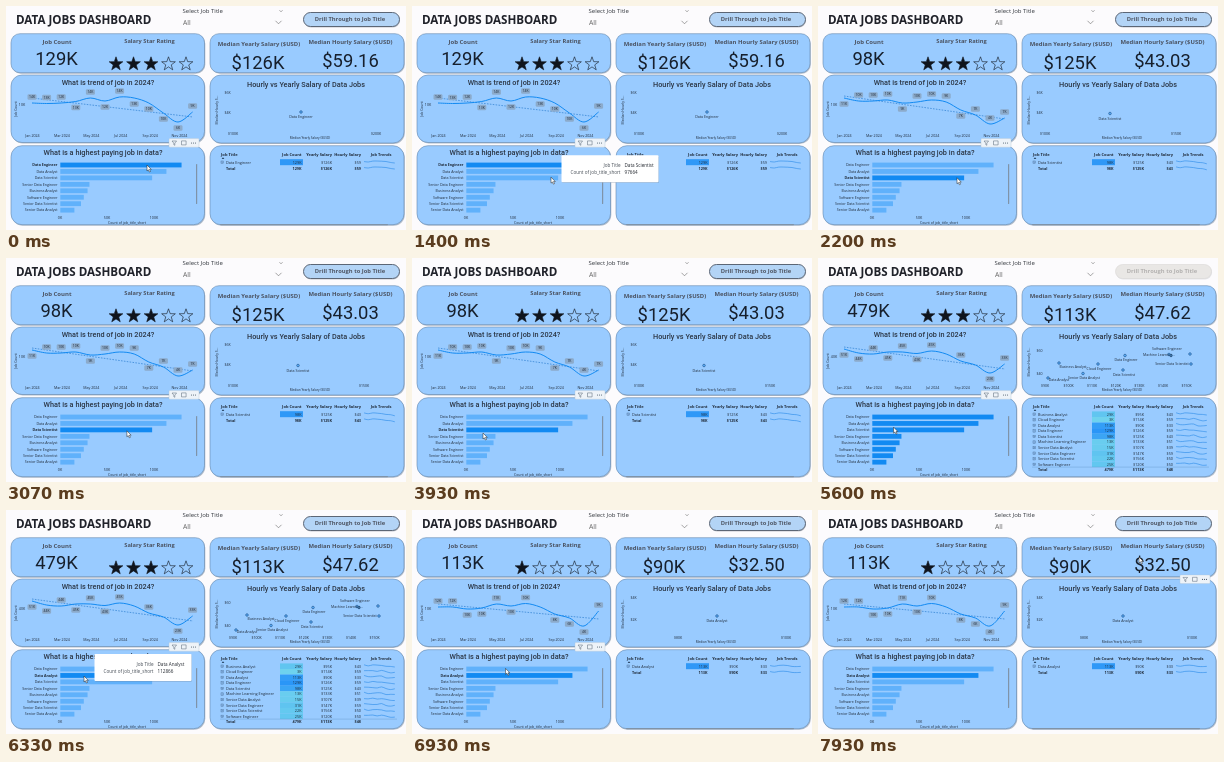
An HTML page for the animation above (8 s loop, 400x224 px).

```html
<!DOCTYPE html>
<html lang="en">
<head>
<meta charset="utf-8">
<title>Data Jobs Dashboard</title>
<style>
html, body { margin: 0; width: 100%; height: 100%; overflow: hidden; background: #fcfbfd; }
svg { display: block; width: 100vw; height: 100vh; font-family: "Open Sans", "Noto Sans", sans-serif; }
.din { font-family: Roboto, Arial, sans-serif; }
</style>
</head>
<body>
<svg id="stage" viewBox="0 0 400 224"><g id="base"></g><g id="live"></g></svg>
<script>
const LOOP = 8000;
const INK = '#1f2a38', TITLE = '#4a5261', PANEL = '#99cbff', BLUE = '#128af2', PALE = '#60b1fb';

// ---- helpers ----
const clamp = v => Math.max(0, Math.min(1, v));
const ease = v => { v = clamp(v); return v * v * (3 - 2 * v); };
const ramp = (t, a, b) => ease((t - a) / (b - a));
const mix = (a, b, k) => a + (b - a) * k;

// y is the middle of the capitals
function text(x, y, str, size, o = {}) {
  const turn = o.turn ? ` transform="rotate(-90 ${x} ${y})"` : '';
  return `<text x="${x}" y="${y + size * 0.36}" font-size="${size}" fill="${o.fill || INK}"` +
    ` text-anchor="${o.at || 'middle'}" font-weight="${o.w || 400}" class="${o.cls || ''}"${turn}>${str}</text>`;
}
const rect = (x, y, w, h, fill, more = '') =>
  `<rect x="${x}" y="${y}" width="${w}" height="${h}" fill="${fill}" ${more}/>`;
const line = (d, color, w, more = '') =>
  `<path d="${d}" fill="none" stroke="${color}" stroke-width="${w}" ${more}/>`;

function panel(x, y, w, h, r) {
  return rect(x + 0.8, y + 1, w, h, '#8494a8', `rx="${r}" opacity=".6"`) +
    rect(x, y, w, h, PANEL, `rx="${r}" stroke="#6688ad" stroke-width=".6"`);
}

function smooth(pts) {
  let d = `M${pts[0]}`;
  for (let i = 0; i < pts.length - 1; i++) {
    const a = pts[i - 1] || pts[i], b = pts[i], c = pts[i + 1], e = pts[i + 2] || c;
    d += `C${b[0] + (c[0] - a[0]) / 6} ${b[1] + (c[1] - a[1]) / 6} ` +
      `${c[0] - (e[0] - b[0]) / 6} ${c[1] - (e[1] - b[1]) / 6} ${c}`;
  }
  return d;
}

function star(cx, cy, r, full) {
  let p = '';
  for (let i = 0; i < 10; i++) {
    const a = Math.PI * (i / 5 - 0.5), q = i % 2 ? r * 0.4 : r;
    p += `${(cx + q * Math.cos(a)).toFixed(2)},${(cy + q * Math.sin(a)).toFixed(2)} `;
  }
  return `<polygon points="${p}" fill="${full ? '#10151d' : 'none'}" stroke="#10151d" stroke-width=".6"/>`;
}

// ---- data ----
// ys: monthly line heights; side: label above (u), below (d) or hidden (-)
const VIEWS = {
  engineer: {
    job: 'Data Engineer', count: '129K', year: '$126K', hour: '$59.16', stars: 3, tick: '10K',
    ys: [97, 97.5, 97, 95.5, 92, 95, 91, 92, 97, 107, 116, 106], side: 'uuudududdddu',
    labels: '14K 13K 12K 13K 14K 12K 14K 13K 10K 10K 6K 9K', trend: [92, 111],
    dot: [295, 106], xt: [['$100K', 227], ['$200K', 370]], yt: [['$6K', 87], ['$4K', 107]]
  },
  scientist: {
    job: 'Data Scientist', count: '98K', year: '$125K', hour: '$43.03', stars: 3, tick: '10K',
    ys: [92, 95, 95, 94, 97, 96, 94, 96, 104, 109, 118, 112], side: 'duuuduuuduuu',
    labels: '11K 10K 10K 10K 9K 10K 10K 9K 7K 7K 4K 7K', trend: [90, 113],
    dot: [292, 107.5], xt: [['$100K', 227], ['$150K', 358]], yt: [['$6K', 87], ['$4K', 106.5]]
  },
  all: {
    count: '479K', year: '$113K', hour: '$47.62', stars: 3, tick: '40K',
    ys: [91, 95, 96, 94, 94, 95.5, 93, 96, 103, 107, 115, 106], side: 'ddududu-u-du',
    labels: '51K 44K 44K 45K 45K 43K 45K 39K 36K 33K 23K 33K', trend: [89, 111],
    xt: '90 100 110 120 130 140 150'.split(' ').map((v, i) => [`$${v}K`, 227 + i * 23.6]),
    yt: [['$60', 93], ['$40', 116]]
  },
  analyst: {
    job: 'Data Analyst', count: '113K', year: '$90K', hour: '$32.50', stars: 1, tick: '10K',
    ys: [97, 97, 99, 98, 94, 96, 93.5, 97, 104, 108, 116, 101], side: 'uuddudu-dddu',
    labels: '12K 12K 10K 10K 11K 10K 10K 9K 8K 6K 4K 9K', trend: [94, 109],
    dot: [305, 106], xt: [['$80K', 266], ['$100K', 374]], yt: [['$4K', 88], ['$2K', 110]]
  }
};

const BARS = [['Data Engineer', 129], ['Data Analyst', 112.9], ['Data Scientist', 97.7],
  ['Senior Data Engineer', 31], ['Business Analyst', 29], ['Software Engineer', 25],
  ['Senior Data Scientist', 22], ['Senior Data Analyst', 15]];

const ROWS = [['Business Analyst', 29, 95, 43], ['Cloud Engineer', 3, 114, 59], ['Data Analyst', 113, 90, 33],
  ['Data Engineer', 129, 126, 59], ['Data Scientist', 98, 125, 43], ['Machine Learning Engineer', 13, 133, 51],
  ['Senior Data Analyst', 15, 107, 39], ['Senior Data Engineer', 31, 147, 59],
  ['Senior Data Scientist', 22, 156, 50], ['Software Engineer', 25, 120, 50]];

// name, dot x, dot y, label x, label y
const DOTS = [['Business Analyst', 241, 105, 255, 109], ['Cloud Engineer', 280, 106, 281, 111],
  ['Data Analyst', 230, 120, 241, 122], ['Senior Data Analyst', 265, 115.5, 266, 120],
  ['Data Engineer', 307, 97.5, 308, 102], ['Data Scientist', 305, 112, 306, 117],
  ['Software Engineer', 353, 97.5, 349, 91], ['Machine Learning...', 351, 96.5, 341, 96.7],
  ['', 372, 96, 372, 96], ['Senior Data Scientist', 373, 106, 354, 106]];

// ---- timeline ----
const SHOWN = [[0, 'engineer'], [1870, 'scientist'], [4400, 'all'], [6470, 'analyst']];
const PICKED = [[0, 'Data Engineer'], [1800, 'Data Scientist'], [4270, ''], [6200, 'Data Analyst']];
const PATH = [[0, 142, 161], [350, 142, 161], [950, 140, 173], [2800, 140, 174], [3600, 72, 177],
  [5300, 72, 177], [5800, 79, 168], [6800, 79, 168], [7650, 322, 49], [8000, 322, 49]];
const TIPS = [[1070, 1900, 'Data Scientist', '97664'], [4130, 4560, 'Data Scientist', '97664'],
  [5870, 6480, 'Data Analyst', '112866']];

const last = (list, t) => list.reduce((n, e, i) => t >= e[0] ? i : n, 0);

function pointer(t) {
  const i = Math.min(last(PATH, t), PATH.length - 2), a = PATH[i], b = PATH[i + 1];
  const k = ramp(t, a[0], b[0]);
  return [mix(a[1], b[1], k), mix(a[2], b[2], k)];
}

// ---- fixed parts ----
function base() {
  const kpi = { w: 700, fill: TITLE }, head = { cls: 'din', w: 500, fill: '#2b3645' };
  const chevron = (x, y, r) => line(`M${x - r} ${y - r / 2}l${r} ${r} ${r} ${-r}`, '#666', 0.6);
  let s = rect(0, 0, 400, 224, '#fcfbfd') +
    text(10, 13.5, 'DATA JOBS DASHBOARD', 11.6, { at: 'start', w: 700, fill: '#20222a' }) +
    text(176.5, 5.3, 'Select Job Title', 6, { at: 'start', fill: '#30343a' }) +
    text(177, 16.5, 'All', 6.8, { at: 'start', fill: '#666' }) +
    chevron(272.5, 16.3, 3) + chevron(275, 5, 1.5) +
    panel(5, 27.7, 193.5, 39, 9) + panel(204, 27.7, 194, 39, 9) +
    panel(5, 69, 193.5, 67.5, 11) + panel(204, 69, 194, 68, 11) +
    panel(5, 139.7, 193.5, 79, 11) + panel(204, 139.7, 194, 79, 11) +
    text(51, 35.8, 'Job Count', 6, kpi) + text(143.5, 35, 'Salary Star Rating', 5.7, kpi) +
    text(253, 38, 'Median Yearly Salary ($USD)', 5.9, kpi) +
    text(344.5, 36, 'Median Hourly Salary ($USD)', 5.9, kpi) +
    text(102, 76.5, 'What is trend of job in 2024?', 7.25, head) +
    text(300, 78.7, 'Hourly vs Yearly Salary of Data Jobs', 7.3, head) +
    text(97, 146, 'What is a highest paying job in data?', 7.3, head) +
    text(10, 103, 'Job Count', 3.4, { turn: 1 }) +
    text(210.5, 104, 'Median Hourly S...', 3.4, { turn: 1 }) +
    text(304, 132.3, 'Median Yearly Salary ($USD)', 3.1) +
    text(121, 217, 'Count of job_title_short', 3.5);
  ['Jan', 'Mar', 'May', 'Jul', 'Sep', 'Nov'].forEach((m, i) =>
    s += text(26.5 + i * 29.4, 130, m + ' 2024', 3.6));
  ['0K', '50K', '100K'].forEach((v, i) => s += text(54 + i * 47, 212, v, 3.6));
  return s;
}

// ---- moving parts ----
function button(on) {
  const edge = on ? 'stroke="#5c6675" stroke-width="1"' : 'stroke="#d5d3d1" stroke-width=".5"';
  return rect(298, 7.5, 96, 14, '#8b919b', `rx="7" opacity="${on ? 0.5 : 0.2}"`) +
    rect(297.5, 6.5, 96, 14, on ? '#b3d4f6' : '#e9e7e5', `rx="7" ${edge}`) +
    text(344, 13.3, 'Drill Through to Job Title', 5.8, { w: 700, fill: on ? '#4f5664' : '#b3b1b0' });
}

function cards(v) {
  const big = { cls: 'din', fill: '#17202d' };
  let s = text(50.5, 52, v.count, 18.4, big) + text(252, 56.3, v.year, 18.4, big) +
    text(344.5, 54, v.hour, 18.4, big);
  for (let i = 0; i < 5; i++) s += star(110 + i * 17.5, 58, 7.2, i < v.stars);
  return s;
}

function trendChart(v, from, k) {
  const px = i => 26 + i * 14.6;
  const pts = v.ys.map((y, i) => [px(i), mix(from.ys[i], y, k)]);
  const names = v.labels.split(' ');
  let s = text(16, 99, v.tick, 3.6) +
    line(`M26 ${mix(from.trend[0], v.trend[0], k)}L187 ${mix(from.trend[1], v.trend[1], k)}`,
      '#2d7fd0', 0.7, 'stroke-dasharray="1.6 1.3"') +
    line(smooth(pts), BLUE, 1);
  pts.forEach(([x, y], i) => {
    if (v.side[i] === '-') return;
    const ly = y + (v.side[i] === 'u' ? -6 : 6);
    s += rect(x - 4.5, ly - 2.8, 9, 5.6, '#8cabcb', 'rx="1.4"') + text(x, ly, names[i], 3.4);
  });
  return s;
}

function scatter(v) {
  const dot = (x, y) => `<circle cx="${x}" cy="${y}" r="1.3" fill="#5aaefa" stroke="#1d4f86" stroke-width=".6"/>`;
  let s = '';
  v.xt.forEach(([n, x]) => s += text(x, 127.6, n, 3.5));
  v.yt.forEach(([n, y]) => s += text(221.5, y, n, 3.5));
  if (v.dot) s += dot(...v.dot) + text(v.dot[0], v.dot[1] + 5.2, v.job, 3.6);
  else DOTS.forEach(([n, x, y, lx, ly]) => s += dot(x, y) + text(lx, ly, n, 3.5));
  return s;
}

function bars(pick) {
  let s = rect(190, 158, 1.2, 40, '#7f93a8', 'rx=".5"');
  BARS.forEach(([name, n], i) => {
    const y = 159 + i * 6.45, on = name === pick;
    s += text(51.5, y, name, 3.6, { at: 'end', w: on ? 700 : 400 }) +
      rect(54.3, y - 2.4, n * 0.94, 4.8, on || !pick ? BLUE : PALE);
  });
  return s;
}

function table(v) {
  const bold = { at: 'end', w: 700 }, rows = v.job ? ROWS.filter(r => r[0] === v.job) : ROWS;
  const y0 = 156.2, step = v.job ? 6 : 5.57;
  const spark = (y, seed) => line(smooth(Array.from({ length: 8 }, (_, i) =>
    [358 + i * 4.4, y + (v.ys[Math.round(i * 11 / 7)] - 102) * 0.13 + Math.sin(i * 1.9 + seed * 2.3) * 0.45])),
    '#1d83e6', 0.55);
  let s = text(215, 148.3, 'Job Title', 4.1, { at: 'start', w: 700 }) +
    '<path d="M215.7 152.9l1.3-1.7 1.3 1.7z" fill="#24405f"/>';
  [['Job Count', 295.5], ['Yearly Salary', 326], ['Hourly Salary', 355], ['Job Trends', 385.5]]
    .forEach(([n, x]) => s += text(x, 148.3, n, 4, bold));
  rows.forEach(([name, n, yr, hr], i) => {
    const y = y0 + i * step, k = n / 129;
    const fill = v.job ? '#2f98f7' : `rgb(${mix(112, 42, k)},${mix(211, 150, k)},${mix(238, 247, k)})`;
    s += rect(274, y - step / 2, 23, step, fill) +
      rect(215, y - 1.2, 2.4, 2.4, 'none', 'stroke="#3f618a" stroke-width=".4"') +
      line(`M215.6 ${y}h1.2m-.6-.6v1.2`, '#3f618a', 0.4) +
      text(220, y, name, 3.8, { at: 'start' }) + text(295.5, y, n + 'K', 3.8, { at: 'end' }) +
      text(326, y, `$${yr}K`, 3.8, { at: 'end' }) + text(355, y, '$' + hr, 3.8, { at: 'end' }) +
      spark(y, i);
  });
  const y = y0 + rows.length * step, hr = v.job ? rows[0][3] : 48;
  return s + text(220, y, 'Total', 3.8, { at: 'start', w: 700 }) + text(295.5, y, v.count, 3.8, bold) +
    text(326, y, v.year, 3.8, bold) + text(355, y, '$' + hr, 3.8, bold) +
    (v.job ? spark(y, 0) + rect(214, 218, 168, 1.2, '#7f93a8', 'rx=".6"')
      : line(`M214 ${y - step / 2}H391`, '#5f93c8', 0.4));
}

function toolbar(x, y) {
  return rect(x, y, 30, 8.6, '#eef3f8', 'rx=".8" stroke="#b4c4d4" stroke-width=".4"') +
    line(`M${x + 3} ${y + 2.4}h4.6l-1.8 2.1v2.2l-1-.6v-1.6z`, '#506070', 0.5) +
    line(`M${x + 12.5} ${y + 2.3}h4.6v4h-4.6z`, '#506070', 0.5) +
    [0, 2, 4].map(d => `<circle cx="${x + 22.5 + d}" cy="${y + 4.4}" r=".55" fill="#506070"/>`).join('');
}

function tooltip(t, x, y) {
  let s = '';
  for (const [a, b, job, n] of TIPS) {
    const alpha = ramp(t, a, a + 170) * (1 - ramp(t, b, b + 260));
    if (alpha <= 0) continue;
    const l = x + 9.5, top = y - 24, grey = { at: 'end', fill: '#444b54' }, val = { at: 'start', fill: '#22272e' };
    s += `<g opacity="${alpha}">` +
      rect(l + 0.5, top + 0.8, 97, 27, '#71869c', 'rx="1" opacity=".4"') + rect(l, top, 97, 27, '#fff', 'rx="1"') +
      text(l + 59, top + 10.3, 'Job Title', 4.6, grey) + text(l + 63, top + 10.3, job, 4.6, val) +
      text(l + 59, top + 17.2, 'Count of job_title_short', 4.6, grey) + text(l + 63, top + 17.2, n, 4.6, val) + '</g>';
  }
  return s;
}

const cursor = (x, y) =>
  `<path transform="translate(${x - 1} ${y - 2})" d="M0 0v6l1.4-1.2 1 2.2 1.1-.5-1-2.1h1.8z"` +
  ' fill="#fff" stroke="#222" stroke-width=".5"/>';

function scene(t) {
  const i = last(SHOWN, t), v = VIEWS[SHOWN[i][1]], from = VIEWS[SHOWN[Math.max(0, i - 1)][1]];
  const pick = PICKED[last(PICKED, t)][1], [x, y] = pointer(t);
  const k = i ? ramp(t, SHOWN[i][0], SHOWN[i][0] + 280) : 1;
  return button(pick) + cards(v) + trendChart(v, from, k) + scatter(v) + bars(pick) + table(v) +
    (y > 132 ? toolbar(163, 132.6) : t > 7400 ? toolbar(362, 65) : '') +
    tooltip(t, x, y) + cursor(x, y);
}

const live = document.getElementById('live');
document.getElementById('base').innerHTML = base();
const start = performance.now();
function frame() {
  live.innerHTML = scene((performance.now() - start) % LOOP);
  requestAnimationFrame(frame);
}
frame();
</script>
</body>
</html>
```
